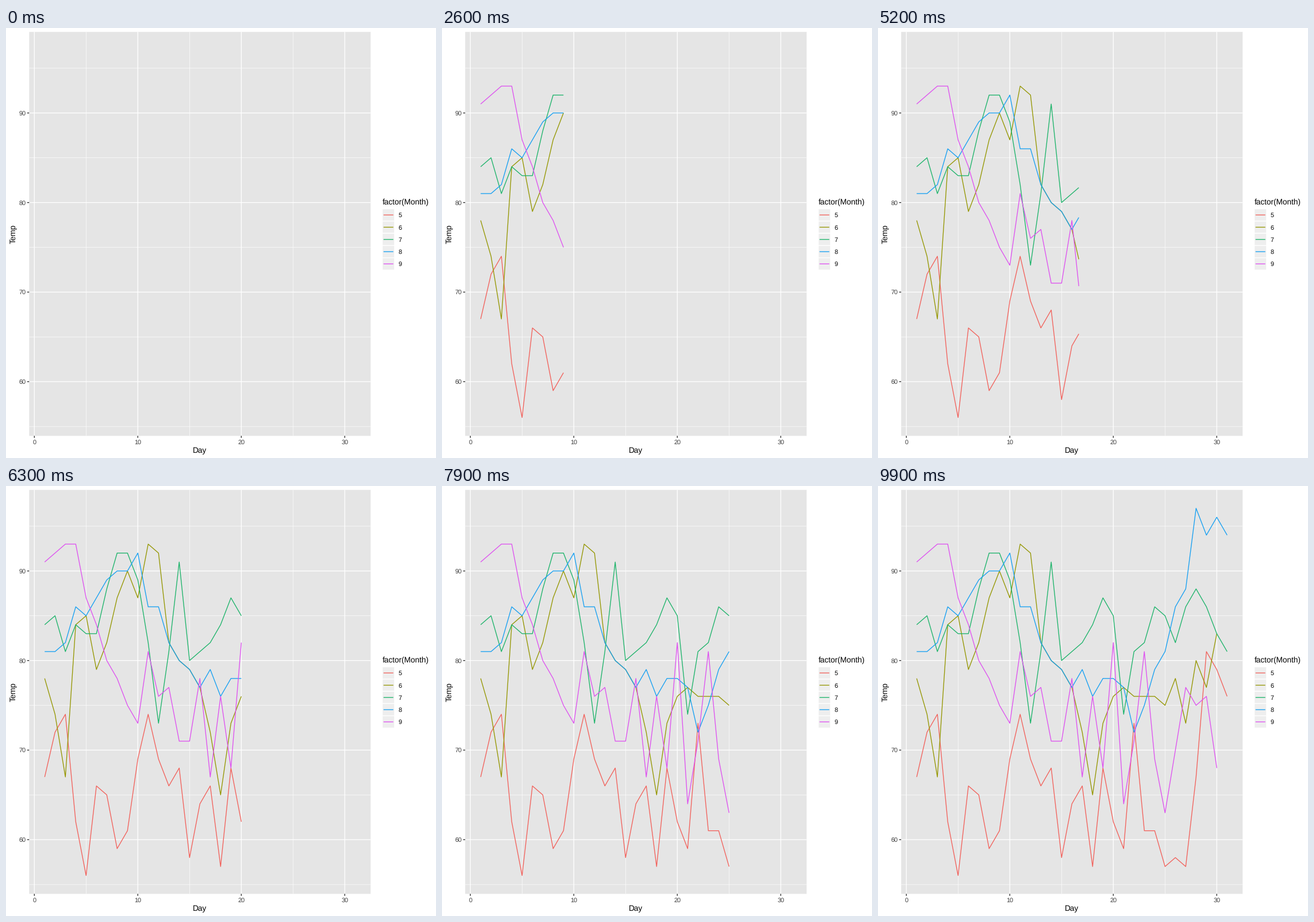
A matplotlib script for the animation above (10 s loop, 748 by 748 pixels).

```python
import numpy as np
import matplotlib.pyplot as plt
from matplotlib.animation import FuncAnimation
from matplotlib.patches import Rectangle

SIZE, DPI = 748, 100
FRAMES, INTERVAL = 100, 100
PT = 72 / DPI                      # points per pixel
LEFT, RIGHT, TOP, BOTTOM = 40.3, 634.3, 6.8, 709.5
THICK, THIN = 1.32, 0.66
TITLE, LABEL = 13.6, 10.9          # font sizes in pixels

plt.rcParams.update({"font.family": "Liberation Sans", "text.hinting": "none"})

# Daily temperatures, one list per month
MID = [82, 80, 79, 77]
MAY = [67, 72, 74, 62, 56, 66, 65, 59, 61, 69, 74, 69, 66, 68, 58, 64,
       66, 57, 68, 62, 59, 73, 61, 61, 57, 58, 57, 67, 81, 79, 76]
JUN = [78, 74, 67, 84, 85, 79, 82, 87, 90, 87, 93, 92, *MID,
       72, 65, 73, 76, 77, *[76] * 3, 75, 78, 73, 80, 77, 83]
JUL = [84, 85, 81, 84, 83, 83, 88, 92, 92, 89, 82, 73, 81, 91, 80, 81,
       82, 84, 87, 85, 74, 81, 82, 86, 85, 82, 86, 88, 86, 83, 81]
AUG = [81, 81, 82, 86, 85, 87, 89, 90, 90, 92, 86, 86, *MID,
       79, 76, 78, 78, 77, 72, 75, 79, 81, 86, 88, 97, 94, 96, 94]
SEP = [91, 92, 93, 93, 87, 84, 80, 78, 75, 73, 81, 76, 77, 71, 71, 78,
       67, 76, 68, 82, 64, 71, 81, 69, 63, 70, 77, 75, 76, 68]
MONTHS = [MAY, JUN, JUL, AUG, SEP]
COLORS = ["#f2605a", "#949600", "#1bb369", "#149ff2", "#de50f0"]


def px(day):
    return LEFT + (day + 0.5) * (RIGHT - LEFT) / 33


def py(temp):
    return TOP + (99.05 - temp) * (BOTTOM - TOP) / 45.1


fig = plt.figure(figsize=(SIZE / DPI, SIZE / DPI), dpi=DPI, facecolor="white")
ax = fig.add_axes([0, 0, 1, 1])
ax.set(xlim=(0, SIZE), ylim=(SIZE, 0))
ax.axis("off")


def line(xs, ys, color, width, z=2):
    return ax.plot(xs, ys, color=color, lw=width * PT, zorder=z, snap=False,
                   solid_capstyle="butt", solid_joinstyle="round")[0]


def box(x, y, w, h, fill, edge="none", width=0.0):
    ax.add_patch(Rectangle((x, y), w, h, fc=fill, ec=edge, lw=width * PT,
                           snap=False, zorder=1))


def text(x, y, s, size, color="black", ha="left", **kw):
    ax.text(x, y, s, fontsize=size * PT, color=color, ha=ha, va="baseline", **kw)


def draw_grid(days, temps, width):
    for t in temps:
        line([LEFT, RIGHT], [py(t)] * 2, "white", width)
    for d in days:
        line([px(d)] * 2, [TOP, BOTTOM], "white", width)


def draw_axes():
    box(LEFT, TOP, RIGHT - LEFT, BOTTOM - TOP, "#e5e5e5")
    days, temps = range(0, 31, 10), range(60, 91, 10)
    draw_grid(range(5, 26, 10), range(55, 96, 10), THIN)
    draw_grid(days, temps, THICK)
    tick, grey = "#242424", "#3b3b3b"
    for d in days:
        line([px(d)] * 2, [BOTTOM, BOTTOM + 3.4], tick, THICK)
        text(px(d), 723.7, str(d), LABEL, grey, "center")
    for t in temps:
        line([LEFT - 3.4, LEFT], [py(t)] * 2, tick, THICK)
        text(34.2, py(t) + 3.9, str(t), LABEL, grey, "right")
    text((LEFT + RIGHT) / 2, 738.7, "Day", TITLE, ha="center")
    text(16.5, (TOP + BOTTOM) / 2, "Temp", TITLE, ha="center",
         rotation=90, rotation_mode="anchor")


def draw_legend():
    x, key = 654.6, 21.28
    text(x, 306.9, "factor(Month)", TITLE)
    for i, color in enumerate(COLORS):
        y = 367.8 + (i - 2) * key
        box(x, y - key / 2, key, key, "#eeeeee", "white", THICK)
        line([x + 0.1 * key, x + 0.9 * key], [y, y], color, THICK)
        text(682.5, y + 3.9, str(i + 5), LABEL)


draw_axes()
draw_legend()
curves = [line([], [], c, THICK, 3 + i) for i, c in enumerate(COLORS)]

# Each day is reached on a whole frame; between days the tip moves linearly
DAYS = np.arange(1, 32)
ARRIVALS = np.round((FRAMES - 1) * (DAYS - 1) / 30)


def update(frame):
    now = np.interp(frame, ARRIVALS, DAYS)
    for curve, temps in zip(curves, MONTHS):
        days = DAYS[:len(temps)]
        tip = min(now, days[-1])
        shown = np.append(days[days < tip], tip)
        if len(shown) < 2:
            curve.set_data([], [])
        else:
            curve.set_data(px(shown), py(np.interp(shown, days, temps)))
    return curves


anim = FuncAnimation(fig, update, frames=FRAMES, interval=INTERVAL,
                     repeat=True, repeat_delay=0)
plt.show()
```
